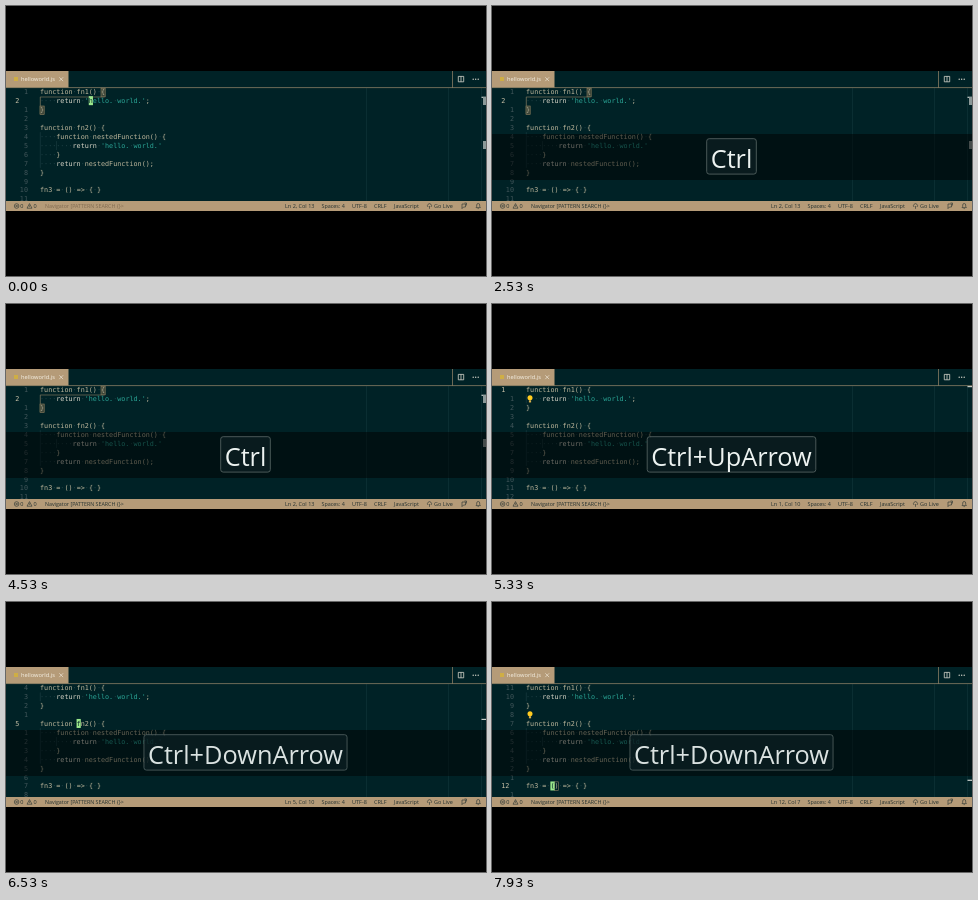
An HTML page that plays this animation: 480 by 270 pixels, repeating every 8000 ms.

```html
<!DOCTYPE html>
<html lang="en">
<head>
<meta charset="utf-8">
<style>
html, body { margin: 0; width: 100%; height: 100%; overflow: hidden; background: #000; }
svg { display: block; width: 480px; height: 270px; font: 5.5px "Open Sans", "Noto Sans", sans-serif; }
text { white-space: pre; }
.code text { font: 6.75px "DejaVu Sans Mono", monospace; fill: #bdb79c; }
.code .num { fill: #41565a; text-anchor: end; }
.code .now { fill: #c9c2a8; text-anchor: start; }
.code .str { fill: #2aa596; }
.code .kw { fill: #d8d6c8; }
.code .dot { fill: #24464a; }
.code .under { fill: #06262a; }
.status { fill: #23302f; }
.thin { fill: none; stroke-width: .6; }
</style>
</head>
<body>
<svg viewBox="0 0 480 270">
  <rect y="65" width="480" height="140" fill="#002226"/>
  <path class="thin" stroke="#12383b" d="M360.5 82V195M442.5 82V195M475.5 82V195"/>
  <g class="code">
    <path id="guides" class="thin" stroke="#1d4043"/>
    <g id="scope" class="thin" stroke="#8d7f5f">
      <path d="M34.3 108V91H98.5" fill="none"/>
      <rect x="95" y="82.2" width="4.2" height="8.6" fill="#3a4337"/>
      <rect x="34" y="100" width="4.2" height="8.6" fill="#3a4337"/>
    </g>
    <rect id="pair" class="thin" stroke="#8d7f5f" width="4.2" height="8.6"/>
    <g id="lines"></g>
    <g id="nums"></g>
    <g id="cursor">
      <rect y="-7" width="4.2" height="9" fill="#9be88c"/>
      <text class="under"></text>
    </g>
  </g>
  <g id="bulb">
    <circle r="2.5" cy="-1" fill="#ffcb1f"/>
    <rect x="-1.1" y="1.4" width="2.2" height="2.2" fill="#d9b04a"/>
  </g>
  <g id="marks" fill="#8b9998">
    <rect id="mark" x="475.5" width="4.5" height="1.2" fill="#c8cfca"/>
    <g id="words"><rect x="477" y="91" width="3" height="8"/><rect x="477" y="135" width="3" height="8"/></g>
  </g>

  <rect y="65" width="62.5" height="16.5" fill="#b59b78"/>
  <path class="thin" stroke="#b59b78" d="M0 81.6H480M446.5 65V81.6"/>
  <rect x="8" y="71" width="4" height="4" fill="#cfae45"/>
  <text x="15" y="75.4" font-size="5.75" fill="#f7f2e6">helloworld.js</text>
  <path class="thin" stroke="#f7f2e6" d="M53.3 71.3l3.8 3.8m0-3.8l-3.8 3.8"/>
  <path class="thin" stroke="#d5d5cb" style="stroke-width:.8" d="M452.3 70.4h5.4v5.4h-5.4zM455 70.4v5.4"/>
  <g fill="#d5d5cb"><circle cx="467.2" cy="73.2" r=".7"/><circle cx="469.7" cy="73.2" r=".7"/><circle cx="472.2" cy="73.2" r=".7"/></g>

  <rect y="195" width="480" height="10" fill="#b59b78"/>
  <g class="status">
    <g class="thin" stroke="#23302f">
      <circle cx="10.6" cy="200" r="2.3"/>
      <path d="M9.6 199l2 2m0-2l-2 2M21 202.2l2.5-4.6 2.5 4.6zM23.5 199.3v1.5"/>
      <path d="M423.5 200v2.8M422 201a2 2 0 1 1 3 0M456 198h3.5v3h-2l-1.5 1.6zM458.5 197h2v2.5M470 201.6h4.4l-.7-1.2v-1.4a1.5 1.5 0 0 0-3 0v1.4zM471.6 202.6h1.2"/>
    </g>
    <text x="14.2" y="202">0</text><text x="27.6" y="202">0</text>
    <text id="nav" x="39" y="202" font-size="5.3">Navigator [PATTERN SEARCH {}></text>
    <text id="pos" x="279" y="202"></text>
    <text x="315.5" y="202" font-size="5.4">Spaces: 4</text><text x="346" y="202">UTF-8</text><text x="368" y="202">CRLF</text>
    <text x="388" y="202">JavaScript</text><text x="428" y="202">Go Live</text>
  </g>

  <g id="keys">
    <rect y="128" width="480" height="46" fill="#000" opacity=".5"/>
    <rect id="key" y="132.7" height="35.4" rx="2.5" fill="#0b1d20" fill-opacity=".85" stroke="#52605f" stroke-width=".9"/>
    <text id="label" x="239.5" y="161.5" text-anchor="middle" font-size="25.3" fill="#edf3f1"></text>
  </g>
</svg>
<script>
const $ = id => document.getElementById(id);
const code = [
  "function fn1() {",
  "    return 'hello. world.';",
  "}",
  "",
  "function fn2() {",
  "    function nestedFunction() {",
  "        return 'hello. world.'",
  "    }",
  "    return nestedFunction();",
  "}",
  "",
  "fn3 = () => { }",
  ""
];
const charW = 4.064, left = 34;
const lineY = n => 79.3 + 8.93 * n;
const colX = c => left + (c - 1) * charW;

// start time, line, column
const stops = [[0, 2, 13], [4800, 1, 10], [6400, 5, 10], [7800, 12, 7]];
const blinks = [530, 1070, 1530, 2070, 2530, 3070, 3530, 4070, 4530, 4800, 5330, 5870, 6330, 6400, 6870, 7400];
// shown from, until, arrow pressed at, arrow
const presses = [[1930, 3070], [3270, 5600, 4800, "Up"], [6330, 7200, 6400, "Down"], [7730, 8000, 7800, "Down"]];
// shown from, until, line
const bulbs = [[5070, 6400, 2], [6670, 8000, 4]];

const span = (cls, s) => `<tspan class="${cls}">${s}</tspan>`;
const dots = s => s.replace(/ +/g, m => span("dot", "·".repeat(m.length)));
const paint = s => s.split(/('.*?'|return)/).map((part, i) =>
  i % 2 ? `<tspan class="${part[0] === "'" ? "str" : "kw"}">${dots(part)}</tspan>`
        : dots(part.replace(/>/g, "&gt;"))).join("");

$("lines").innerHTML = code.map((s, i) => `<text x="${left}" y="${lineY(i + 1)}">${paint(s)}</text>`).join("");
const guide = (c, from, to) => `M${colX(c) + .3} ${lineY(from) - 6.7}V${lineY(to) + 2.2}`;
$("guides").setAttribute("d", guide(1, 2, 2) + guide(1, 6, 9) + guide(5, 7, 7));

const show = (id, on) => $(id).setAttribute("visibility", on ? "visible" : "hidden");
const move = (id, x, y) => $(id).setAttribute("transform", `translate(${x} ${y})`);
const during = t => ([from, to]) => t >= from && t < to;

let shownLine, shownKeys;

function place(line, col) {
  $("nums").innerHTML = code.map((_, i) => {
    const n = i + 1, here = n === line;
    return `<text class="${here ? "now" : "num"}" x="${here ? 9.3 : 22}" y="${lineY(n)}">${here ? n : Math.abs(n - line)}</text>`;
  }).join("");
  $("pos").textContent = `Ln ${line}, Col ${col}`;
  move("cursor", colX(col), lineY(line));
  document.querySelector("#cursor text").textContent = code[line - 1][col - 1];
  $("mark").setAttribute("y", 73.3 + 8.7 * line);
  $("pair").setAttribute("x", colX(8));
  $("pair").setAttribute("y", lineY(12) - 6.6);
  show("pair", line === 12);
  show("scope", line === 2);
  show("words", line === 2);
}

function setKeys(text) {
  $("label").textContent = text;
  const w = $("label").getComputedTextLength() + 8;
  $("key").setAttribute("x", 239.5 - w / 2);
  $("key").setAttribute("width", w);
}

function draw(t) {
  const [, line, col] = stops.filter(s => s[0] <= t).pop();
  if (line !== shownLine) place(shownLine = line, col);
  show("cursor", blinks.filter(b => b <= t).length % 2 === 0);

  const bulb = bulbs.find(during(t));
  show("bulb", bulb);
  if (bulb) move("bulb", 38, lineY(bulb[2]) - 2.3);

  $("nav").setAttribute("fill", t < 2130 ? "#806a50" : "#23302f");

  const press = presses.find(during(t));
  show("keys", press);
  if (press) {
    const [from, , at, arrow] = press;
    const text = t >= at ? `Ctrl+${arrow}Arrow` : "Ctrl";
    if (text !== shownKeys) setKeys(shownKeys = text);
    $("keys").setAttribute("opacity", Math.min(1, .25 + (t - from) / 300));
  }
}

const start = performance.now();
function tick(now) {
  draw(Math.max(0, now - start) % 8000);
  requestAnimationFrame(tick);
}
draw(0);
requestAnimationFrame(tick);
</script>
</body>
</html>
```
